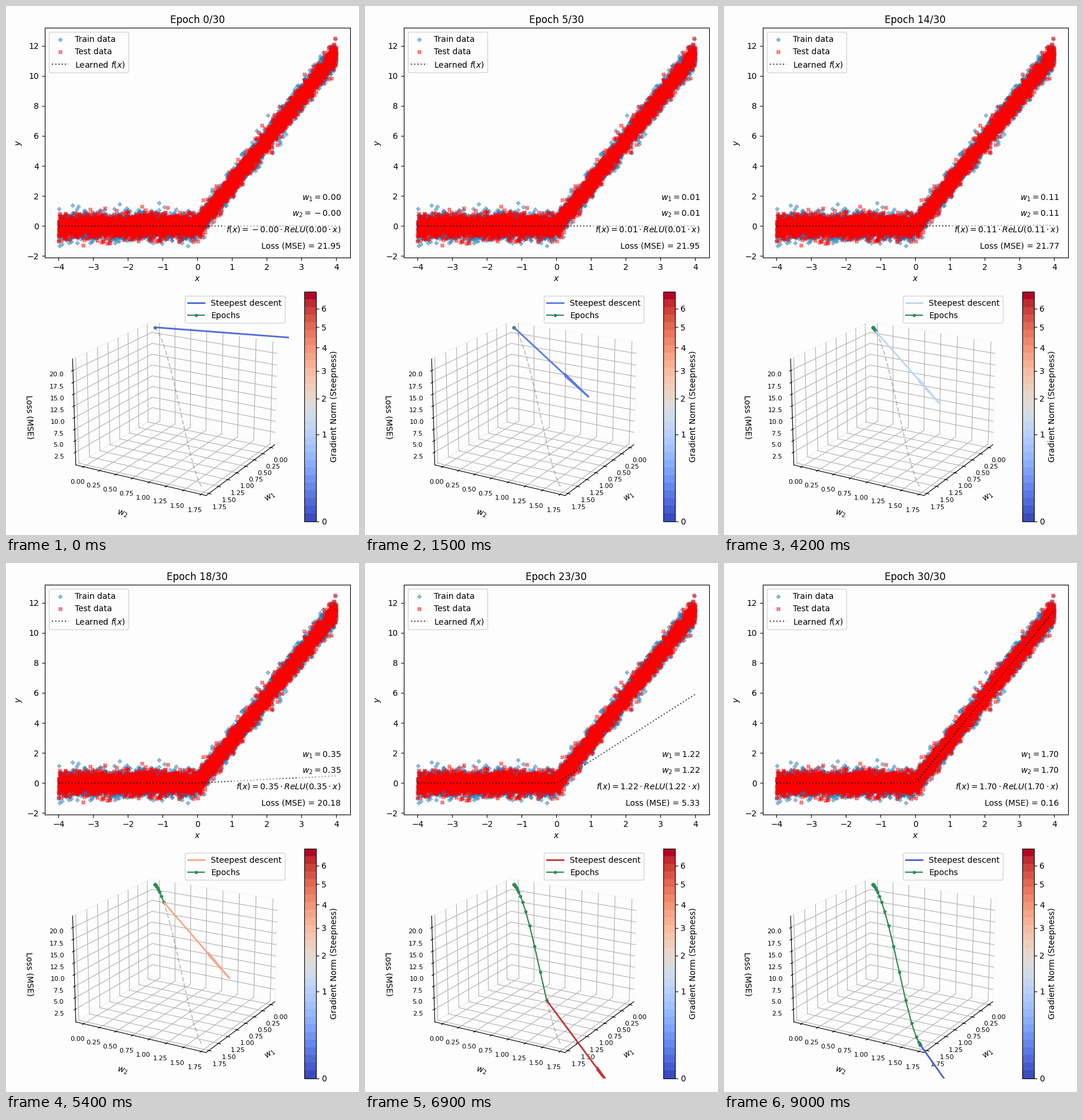
These frames come from a looping animation (600x900 px, 9300 ms). A matplotlib script:

```python
import numpy as np
import matplotlib.pyplot as plt
from matplotlib.animation import FuncAnimation
from matplotlib.cm import ScalarMappable
from matplotlib.colors import PowerNorm

EPOCHS = 30
SLOPE, POWER, NOISE = 2.88, 2.627, 0.158  # true slope, mean relu(x)^2, noise variance
RATE = 0.118346

# Gradient descent on f(x) = w2 * relu(w1 * x)
mean, diff = 0.025 / (1 + RATE * SLOPE) ** 9, 0.0031
w = np.zeros((EPOCHS + 1, 2))
w[0] = mean + diff, mean - diff
for k in range(EPOCHS):
    w[k + 1] = w[k] + RATE * (SLOPE - w[k].prod()) * w[k, ::-1]
gap = SLOPE - w.prod(axis=1)
loss = POWER * gap ** 2 + NOISE
descent = POWER * gap[:, None] * w[:, ::-1]
steepness = np.linalg.norm(descent, axis=1)

rng = np.random.default_rng(7)


def relu(x):
    return np.maximum(x, 0)


def make_data(count):
    x = rng.uniform(-4, 4, count)
    return x, SLOPE * relu(x) + rng.normal(0, NOISE ** 0.5, count)


def padded(low, high, part):
    pad = (high - low) * part
    return low - pad, high + pad


plt.rcParams.update({"figure.facecolor": "#fdfdfd", "axes.facecolor": "#fdfdfd"})
fig = plt.figure(figsize=(6, 9), dpi=100)

# Data and learned function
ax = fig.add_subplot(211)
ax.scatter(*make_data(6000), s=20, marker="P", color="tab:blue", alpha=0.4,
           label="Train data")
ax.scatter(*make_data(4000), s=20, marker="X", color="red", alpha=0.4,
           label="Test data")
knots = np.array([-4, 0, 4])
fit, = ax.plot(knots, 0 * knots, "k:", alpha=0.7, label="Learned $f(x)$")
ax.set(xlim=(-4.4, 4.4), ylim=(-2.09, 13.18), xlabel="$x$", ylabel="$y$")
ax.legend(loc="upper left")
title = ax.set_title("Epoch 0")
notes = [ax.text(0.97, 0.25 - 0.07 * i, "", ha="right", transform=ax.transAxes,
                 bbox=dict(facecolor="white", alpha=0.5, edgecolor="none"))
         for i in range(4)]

# Loss landscape
ax3 = fig.add_subplot(212, projection="3d")
ax3.view_init(elev=20, azim=30)
ax3.plot(w[:, 0], w[:, 1], loss, "--", color="gray", alpha=0.45)
trail, = ax3.plot([], [], [], "o-", color="seagreen", markersize=3, label="Epochs")
span = padded(*padded(0, w.max(), 0.05), 1 / 48)
ax3.set(xlim=span, ylim=span, zlim=padded(loss.min(), loss.max(), 1 / 48))
ax3.set_xticks(np.arange(0, 1.8, 0.25))
ax3.set_yticks(np.arange(0, 1.8, 0.25))
ax3.set_zticks(np.arange(2.5, 20.1, 2.5))
ax3.tick_params(labelsize=8)
ax3.set_xlabel("$w_1$", labelpad=10)
ax3.set_ylabel("$w_2$", labelpad=10)
ax3.set_zlabel("Loss (MSE)", labelpad=10)
for axis in (ax3.xaxis, ax3.yaxis, ax3.zaxis):
    axis.pane.set_fill(False)

proxy = plt.Line2D([], [], lw=2, label="Steepest descent")
arrow_key = ax3.legend(handles=[proxy, trail], loc="upper right").get_lines()[0]

# Gradient colour scale
shades = plt.get_cmap("coolwarm")
norm = PowerNorm(0.5, vmin=0, vmax=steepness.max())
fig.colorbar(ScalarMappable(norm, plt.get_cmap("coolwarm", 30)), ax=ax3, pad=0.05,
             ticks=range(7), label="Gradient Norm (Steepness)")
fig.tight_layout()


def update(k):
    w1, w2 = w[k]
    title.set_text(f"Epoch {k}/{EPOCHS}")
    fit.set_ydata(w2 * relu(w1 * knots))
    lines = (f"$w_1 = {w1:.2f}$",
             f"$w_2 = {w2:.2f}$",
             rf"$f(x) = {w2:.2f} \cdot ReLU({w1:.2f} \cdot x)$",
             f"Loss (MSE) = {loss[k]:.2f}")
    for note, line in zip(notes, lines):
        note.set_text(line)

    trail.set_data_3d(w[:k + 1, 0], w[:k + 1, 1], loss[:k + 1])
    for old in list(ax3.collections):
        old.remove()
    color = shades(float(norm(steepness[k])))
    u, v = 3 * descent[k] / steepness[k]
    ax3.quiver(w1, w2, loss[k], u, v, 0, color=color, lw=2)
    arrow_key.set_color(color)


anim = FuncAnimation(fig, update, frames=EPOCHS + 1, interval=300, repeat=True)
plt.show()
```
